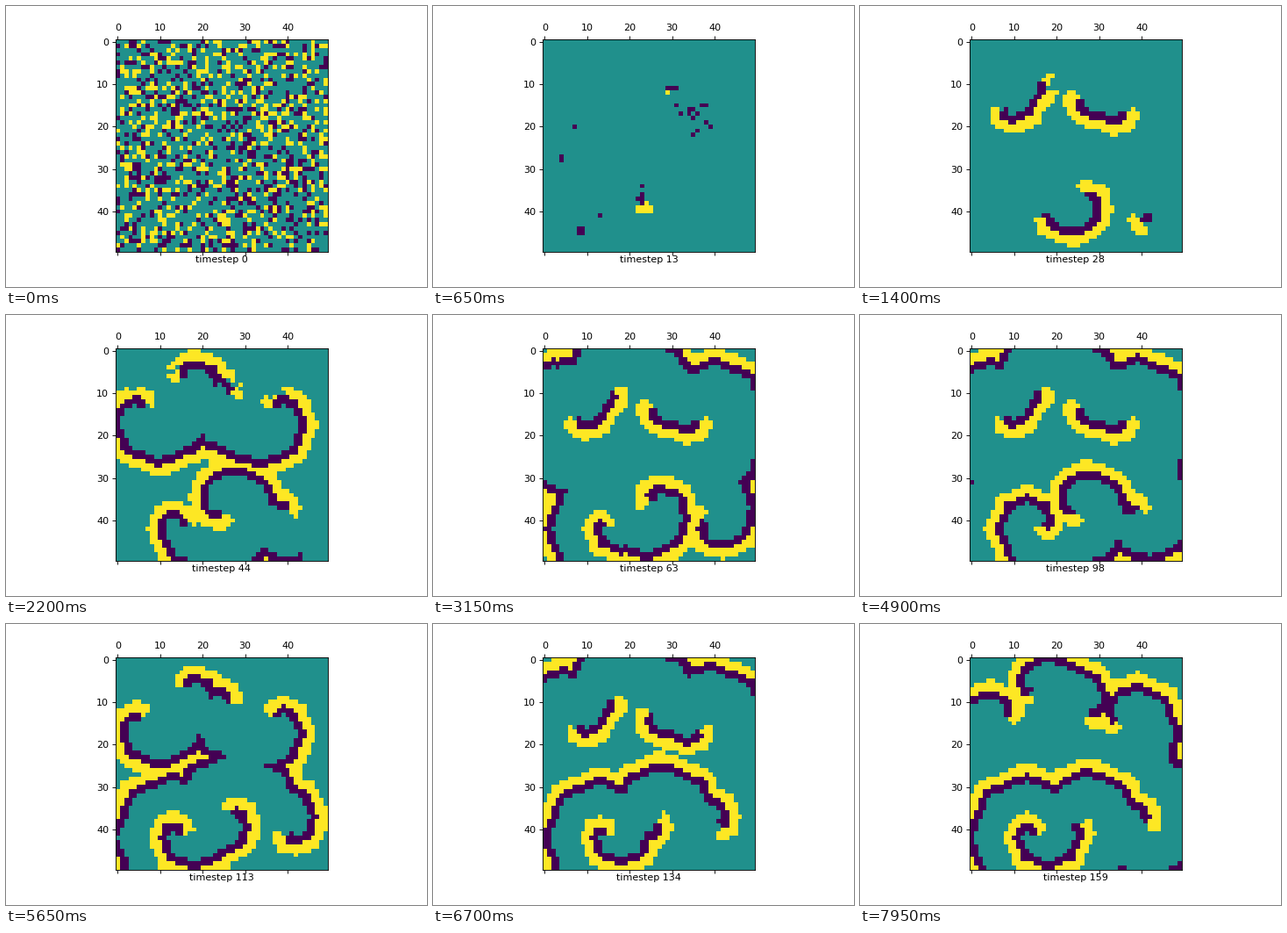
These frames come from a looping animation (480x320 px, 8 s). A matplotlib script:

```python
import numpy as np
import matplotlib.pyplot as plt
from matplotlib.animation import FuncAnimation

W, H, DPI = 480, 320, 80
N, STEPS, INTERVAL = 50, 160, 50
EXCITED, SPENT, RECOVERY = 5, 9, 22   # ages, in steps
SLOWNESS = 2.0                        # steps needed to cross one cell
CORE, RIM, SHADOW = 1.6, 3.6, 13
NEVER = -99.0

# Spiral waves: x, y, spin, period, tip angle at a reference step, that step, first step
SPIRALS = [
    (7.0, 14.5, 1, 36, 224, 36, 14),
    (15.5, 8.0, -1, 36, -85, 36, 14),
    (26.2, 11.8, 1, 35, 263, 36, 14),
    (36.2, 14.7, -1, 35, -52, 36, 14),
    (25.5, 37.0, -1, 28, -10, 21, 12),
    (39.5, 39.5, 1, 28, 67, 22, 26),
]
SHIFTS = [(dy, dx) for dy in (-1, 0, 1) for dx in (-1, 0, 1) if dy or dx]
rows, cols = np.mgrid[0:N, 0:N]


def neighbours(grid, fill):
    """Yield (distance, shifted grid) for the eight neighbours."""
    padded = np.pad(grid, 1, constant_values=fill)
    for dy, dx in SHIFTS:
        yield np.hypot(dy, dx), padded[1 + dy:1 + dy + N, 1 + dx:1 + dx + N]


def start_noise():
    """Firing times of the random soup."""
    rng = np.random.default_rng(7)
    kind = rng.random((N, N))
    young = -rng.integers(0, EXCITED, (N, N)).astype(float)
    old = -rng.integers(EXCITED, SPENT, (N, N)).astype(float)
    return np.where(kind < 0.21, young, np.where(kind < 0.42, old, NEVER))


def step_noise(fired, t):
    hot = (t - 1 - fired < EXCITED).astype(int)
    count = sum(g for _, g in neighbours(hot, 0))
    rest = t - fired >= SPENT
    return np.where(rest & (count >= 4), t, fired)


def spread(fired, t, wake):
    """Pass the wave on to recovered cells, keeping fractional arrival times."""
    arrival = np.full((N, N), np.inf)
    for dist, other in neighbours(fired, NEVER):
        fresh = t - other < 6
        arrival = np.minimum(arrival, np.where(fresh, other + SLOWNESS * dist, np.inf))
    ready = (arrival <= t) & (arrival - fired >= RECOVERY) & (arrival >= wake)
    return np.where(ready, arrival, fired)


def polar(spiral, t):
    """Distance from the centre, and steps since the tip last pointed there."""
    x, y, spin, period, angle, ref, _ = spiral
    r = np.hypot(cols - x, rows - y)
    bearing = np.degrees(np.arctan2(rows - y, cols - x))
    return r, (spin * (angle - bearing) * period / 360 + t - ref) % period


def rest_times():
    """Cells behind a newborn arm sleep until its tip comes round."""
    wake = np.full((N, N), NEVER)
    for spiral in SPIRALS:
        period, start = spiral[3], spiral[6]
        r, lag = polar(spiral, start)
        behind = (r < SHADOW) & (lag > 4) & (lag < 0.6 * period)
        wake = np.where(behind, np.maximum(wake, start + period - lag - 2), wake)
        wake[r < RIM] = np.inf
    return wake


def drive(fired, t, spiral):
    """Turn the tip of one spiral."""
    if t < spiral[6]:
        return fired
    r, lag = polar(spiral, t)
    return np.where((r >= CORE) & (r < RIM), t - lag, fired)


def simulate():
    noise = start_noise()
    wave = np.full((N, N), NEVER)
    wake = rest_times()
    history = []
    for t in range(STEPS):
        if t:
            noise = step_noise(noise, t) if t < 20 else np.full((N, N), NEVER)
            wave = spread(wave, t, wake)
        for spiral in SPIRALS:
            wave = drive(wave, t, spiral)
        age = t - np.maximum(noise, wave)
        history.append(np.where(age < EXCITED, 2, np.where(age < SPENT, 0, 1)))
    return history


states = simulate()

plt.rcParams["font.family"] = "DejaVu Sans"
plt.rcParams["font.size"] = 10
fig = plt.figure(figsize=(W / DPI, H / DPI), dpi=DPI, facecolor="white")
ax = fig.add_axes([125 / W, 39.8 / H, 242 / W, 242 / H])
image = ax.imshow(states[0], cmap="viridis", vmin=0, vmax=2, interpolation="nearest")
ax.set_xticks(range(0, N, 10))
ax.set_yticks(range(0, N, 10))
ax.tick_params(axis="x", top=True, bottom=True, labeltop=True, labelbottom=False)
label = fig.text(246 / W, 1 - 292 / H, "timestep 0", ha="center", va="baseline")


def draw(t):
    image.set_data(states[t])
    label.set_text(f"timestep {t}")
    return image, label


anim = FuncAnimation(fig, draw, frames=STEPS, interval=INTERVAL,
                     repeat=True, repeat_delay=0, blit=False)
plt.show()
```
